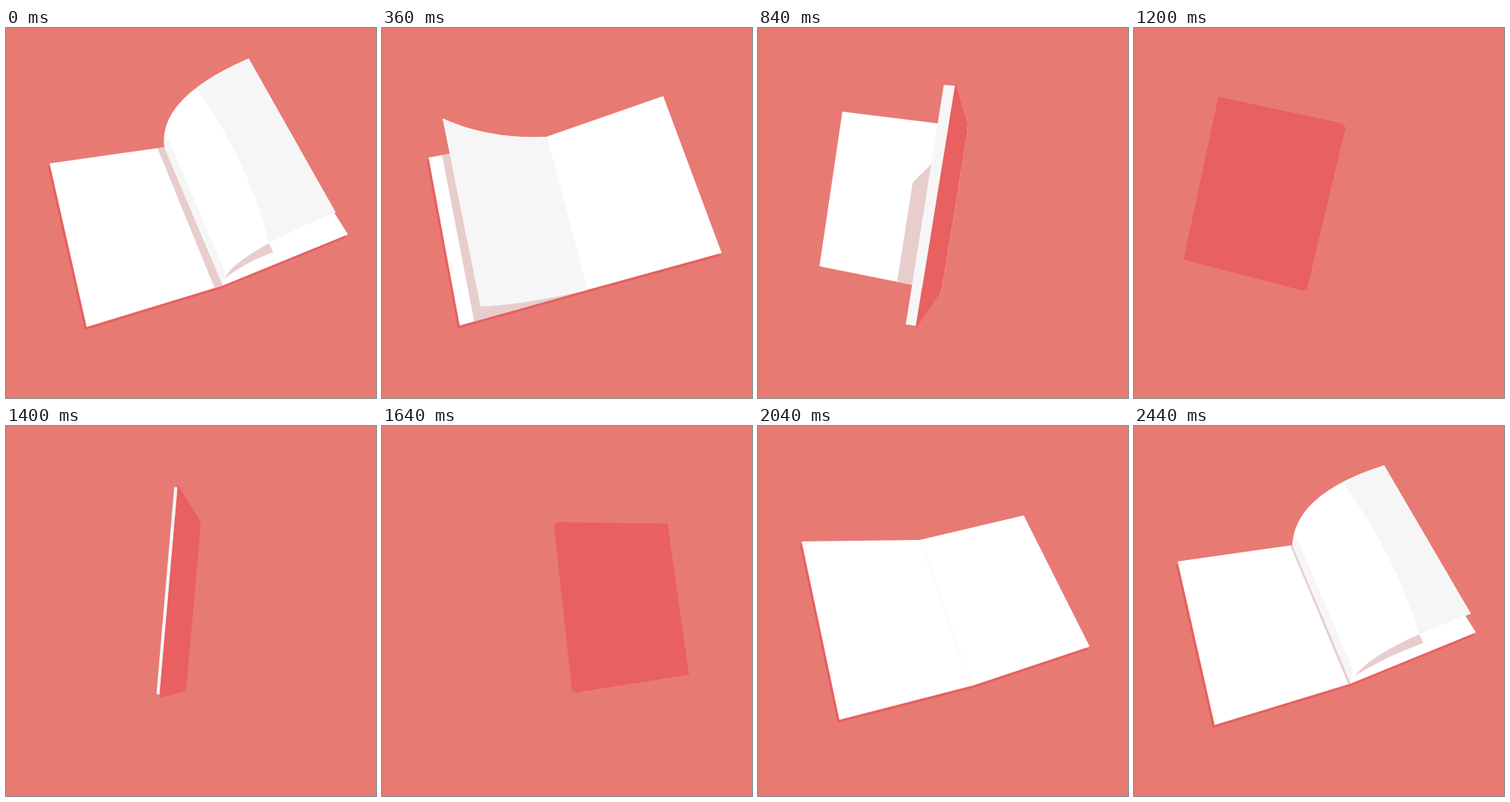
Animation of 500x500 px, one loop 2.48 s. Source, as an HTML page with a canvas:

```html
<!DOCTYPE html>
<html>
<head>
<meta charset="utf-8">
<style>
  html, body { margin: 0; width: 100%; height: 100%; overflow: hidden; background: #e87a74; }
  canvas { display: block; }
</style>
</head>
<body>
<canvas id="stage" width="500" height="500"></canvas>
<script>
const ctx = document.getElementById('stage').getContext('2d');
const LOOP = 2480, STEP = 40;
const BACK = '#e87a74', COVER = '#e86060', PAPER = '#fff', PALE = '#f6f6f6', SHADE = '#e8cdcd';

// Resting poses of the book. Lines run from top to bottom; a missing half mirrors the other.
const shut = { tilt: .3, spine: [[287, 130], [233, 356]], left: [[114, 93], [67, 313]] };
const front = { tilt: .3, spine: [[232, 130], [257, 361]], right: [[386, 132], [415, 336]] };
const spread = { tilt: .9, spine: [[219, 154], [289, 351]],
  left: [[59, 156], [110, 397]], right: [[359, 121], [448, 298]] };
const rest = { tilt: 1, spine: [[214, 161], [293, 348]],
  left: [[59, 183], [109, 404]], right: [[350, 100], [462, 279]] };
const turned = { tilt: .8, spine: [[222, 147], [277, 354]],
  left: [[63, 175], [105, 402]], right: [[380, 92], [459, 304]] };
const lifted = { tilt: 0, spine: [[284, 134], [248, 355]], left: [[114, 113], [83, 322]] };

const moves = [[1200, shut], [1640, front], [2040, spread], [2440, rest], [2480, rest],
  [2840, turned], [3320, lifted], [3680, shut]];

const clamp = (v, a = 0, b = 1) => Math.min(b, Math.max(a, v));
const part = (t, from, to) => clamp((t - from) / (to - from));
const smooth = x => (1 - Math.cos(Math.PI * x)) / 2;
const swingOut = x => 1 - Math.pow(1 - x, 1.2);
const mix = (p, q, k) => p.map((v, i) => v + (q[i] - v) * k);
const mixLine = (a, b, k) => a.map((p, i) => mix(p, b[i], k));
const add = (p, x, y) => [p[0] + x, p[1] + y];

for (const pose of [shut, front, lifted]) {
  const mirror = line => mixLine(line, pose.spine, 2);
  pose.left = pose.left || mirror(pose.right);
  pose.right = pose.right || mirror(pose.left);
}

function poseAt(t) {
  const i = moves.findIndex((m, n) => n > 0 && t <= m[0]);
  const [start, a] = moves[i - 1], [end, b] = moves[i];
  const k = smooth(part(t, start, end));
  const pose = { tilt: a.tilt + (b.tilt - a.tilt) * k };
  for (const name of ['spine', 'left', 'right']) pose[name] = mixLine(a[name], b[name], k);
  return pose;
}

// Free edge of a leaf turned about the spine, from 0 (right) to 1 (left), rising to the viewer.
function swing({ tilt, spine, left, right }, turn, lift = 1) {
  const [top, bottom] = spine, rise = Math.sin(Math.PI * turn) * lift;
  const stretch = .26 - .14 * tilt;
  return mixLine(right, left, smooth(turn)).map((p, i) => {
    const grow = i ? -stretch : stretch;
    return add(p, rise * (15 * tilt + grow * (top[0] - bottom[0])),
      rise * (-95 * tilt + grow * (top[1] - bottom[1])));
  });
}

function fill(color, points) {
  ctx.fillStyle = color;
  ctx.beginPath();
  points.forEach(p => ctx.lineTo(p[0], p[1]));
  ctx.fill();
}

function curve(a, c, b, from = 0, to = 1) {
  return Array.from({ length: 25 }, (_, i) => {
    const k = from + (to - from) * i / 24;
    return mix(mix(a, c, k), mix(c, b, k), k);
  });
}

function paperHalf([top, bottom], [edgeTop, edgeBottom], color, rim = 0) {
  fill(color, [top, edgeTop, edgeBottom, bottom].map(p => add(p, -2.6 * rim, 4.2 * rim)));
}

// Outside of a cover, with the paper that shows beyond its free edge.
function coverHalf([top, bottom], [edgeTop, edgeBottom], side, thickness) {
  const dx = (edgeTop[0] + edgeBottom[0] - top[0] - bottom[0]) / 2;
  const gap = side * thickness * Math.max(0, 1 - Math.abs(dx) / 150);
  if (Math.abs(gap) > .5) {
    fill(PALE, [add(edgeTop, 0, 4), add(edgeTop, -gap, 3), add(edgeBottom, -gap * .85, -6), add(edgeBottom, 0, -4)]);
  }
  fill(COVER, [edgeTop, mix(top, edgeTop, .035), mix(top, bottom, .02),
    mix(bottom, top, .015), mix(bottom, edgeBottom, .03), edgeBottom]);
}

function coverShade([top, bottom], [edgeTop, edgeBottom], reach) {
  const low = mix(bottom, edgeBottom, reach);
  fill(SHADE, [bottom, low, mix(low, mix(top, edgeTop, reach), .62), top]);
}

function turningPage(t, pose) {
  const [top, bottom] = pose.spine;
  const turn = smooth(Math.pow(part(t, 2040, 3000), 1.6));
  const [outerTop, outerBottom] = swing(pose, turn);
  const [bendTop, bendBottom] = mixLine(pose.spine, swing(pose, Math.pow(turn, .38)), .5);
  const split = clamp(.64 - (t - 2480) * .00225);

  const reach = .88 * Math.pow(clamp((t - 2408) / 430, 0, 1.08), 1.5);
  const shadeEdge = mixLine(pose.spine, pose.left, reach);
  fill(SHADE, [top, ...shadeEdge, bottom]);

  if (split < 1 && split > .15) {
    const upper = curve(bottom, bendBottom, outerBottom, .12, split);
    const k = clamp((1 - split) * 4);
    const low = add(upper[24], 6 * k, 12 * k);
    fill(SHADE, [...upper, ...curve(low, add(mix(upper[0], low, .5), -5, -4), upper[0])]);
  }

  fill(PAPER, [...curve(top, bendTop, outerTop), ...curve(bottom, bendBottom, outerBottom).reverse()]);
  if (split === 1) return;
  if (split > .3) fill(PALE, [top, add(top, 1, -8), add(top, 6, -10), add(bottom, 3, -18), bottom]);
  const upperEdge = curve(top, bendTop, outerTop, split);
  const lowerEdge = curve(bottom, bendBottom, outerBottom, split).reverse();
  const a = lowerEdge[24], b = upperEdge[0], bulge = split * (1 - split);
  fill(PALE, [...upperEdge, ...lowerEdge, ...curve(a, add(mix(a, b, .5), 90 * bulge, -45 * bulge), b)]);
}

function draw(time) {
  const t = time < 1200 ? time + LOOP : time;
  const pose = poseAt(t), closed = t <= 1640 || t === 3680;
  const flip = 1 - smooth(part(t, 1200, 1640));
  const leftTurn = closed ? flip : swingOut(part(t, 1640, 2020));
  const rightTurn = closed ? flip : swingOut(part(t, 2980, 3680));
  const lift = closed ? .6 : 1;
  const left = { edge: swing(pose, leftTurn, lift), side: -1, open: leftTurn > .5, shade: 1 - leftTurn };
  const right = { edge: swing(pose, rightTurn, lift), side: 1, open: rightTurn <= .5, shade: rightTurn };
  const open = [left, right].filter(h => h.open && !closed);
  const rim = part(t, 1840, 2000) * (1 - part(t, 2880, 3280));

  fill(BACK, [[0, 0], [500, 0], [500, 500], [0, 500]]);
  open.forEach(h => paperHalf(pose.spine, h.edge, COVER, rim));
  open.forEach(h => paperHalf(pose.spine, h.edge, PAPER));
  if (open.length === 1) {
    const moving = open[0] === left ? right : left;
    coverShade(pose.spine, open[0].edge, clamp((moving.shade - .28) * 1.35));
  }
  [left, right].filter(h => !h.open)
    .forEach(h => coverHalf(pose.spine, h.edge, h.side, closed ? 6 : 19));
  if (t >= 2040 && t < 3000) turningPage(t, pose);
}

function frame() {
  draw(Math.floor(performance.now() % LOOP / STEP) * STEP);
  requestAnimationFrame(frame);
}
frame();
</script>
</body>
</html>
```
